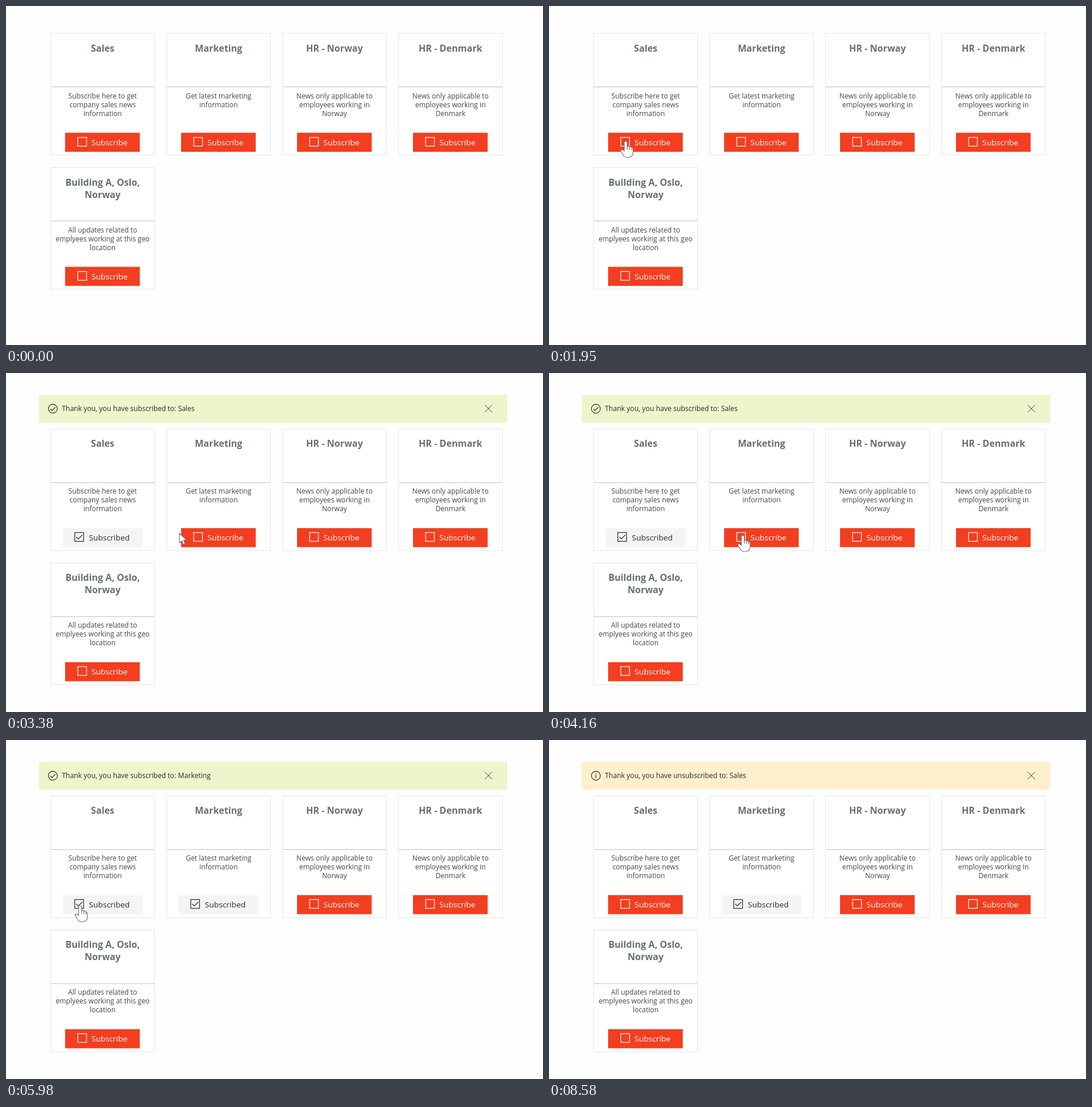
Recreate the animation shown at these times as an HTML page with a canvas. Size 917 by 579 pixels, loop 8.84 s.

```html
<!DOCTYPE html>
<html lang="en">
<head>
<meta charset="utf-8">
<title>Subscriptions</title>
<style>
  html, body { margin: 0; width: 100%; height: 100%; overflow: hidden; background: #fefefe; }
  canvas { display: block; }
</style>
</head>
<body>
<canvas id="stage" width="917" height="579"></canvas>
<script>
const ctx = document.getElementById('stage').getContext('2d');
const LOOP = 8840, STEP = 130;
const FONT = '"Open Sans", "Noto Sans", sans-serif';
const RED = '#f33e20', DARK = '#2b2b2b';

const cards = [
  { title: ['Sales'], body: ['Subscribe here to get', 'company sales news', 'information'] },
  { title: ['Marketing'], body: ['Get latest marketing', 'information'] },
  { title: ['HR - Norway'], body: ['News only applicable to', 'employees working in', 'Norway'] },
  { title: ['HR - Denmark'], body: ['News only applicable to', 'employees working in', 'Denmark'] },
  { title: ['Building A, Oslo,', 'Norway'], body: ['All updates related to', 'emplyees working at this geo', 'location'] }
].map((c, i) => ({ ...c, cx: 165 + 198 * (i % 4), top: 46.5 + 229 * Math.floor(i / 4) }));

// Pointer stops: time, x, y
const stops = [
  [910, 215, 438], [1430, 137, 250], [1690, 133, 237], [1950, 131, 231],
  [2730, 131, 231], [3640, 337, 284], [3770, 333, 280], [4160, 331, 277.5],
  [5070, 331, 277.5], [5980, 126.5, 283], [8060, 126.5, 283], [8450, 22, 560]
];

function pointerAt(t) {
  const i = stops.findIndex(s => s[0] > t);
  if (i === 0 || t >= 8580) return null;
  if (i < 0) return stops[stops.length - 1].slice(1);
  const [t0, x0, y0] = stops[i - 1], [t1, x1, y1] = stops[i];
  const p = (t - t0) / (t1 - t0), e = p * p * (3 - 2 * p);
  return [x0 + (x1 - x0) * e, y0 + (y1 - y0) * e];
}

function text(str, x, y, size, color, align = 'left', weight = 400) {
  ctx.font = `${weight} ${size}px ${FONT}`;
  ctx.textAlign = align;
  ctx.fillStyle = color;
  ctx.fillText(str, x, y);
}

function rect(x, y, w, h, color) {
  ctx.fillStyle = color;
  ctx.fillRect(x, y, w, h);
}

function line(points, color, width) {
  ctx.beginPath();
  points.forEach(([x, y]) => ctx.lineTo(x, y));
  ctx.strokeStyle = color;
  ctx.lineWidth = width;
  ctx.stroke();
}

function drawButton(cx, top, dy, on) {
  const y = top + 170, ty = y + Math.floor(dy);
  const half = on ? 68 : 64, left = cx - (on ? 47.5 : 42.5);
  const ink = on ? DARK : '#fff';
  rect(cx - half, y + dy, half * 2 - (on ? 0 : 0.5), 32.5, on ? '#f4f4f4' : RED);
  ctx.strokeStyle = ink;
  ctx.lineWidth = 1.2;
  ctx.strokeRect(left, ty + 8, 15, 15);
  if (on) line([[left + 2.5, ty + 15.5], [left + 6, ty + 19], [left + 13, ty + 12]], ink, 1.2);
  text(on ? 'Subscribed' : 'Subscribe', cx - (on ? 23.5 : 19), ty + 21.5, 13.5, ink);
}

function drawCard({ title, body, cx, top }, dy, on) {
  const y = Math.round(top + dy - 0.5) + 0.5;
  const ty = top + Math.floor(dy);
  rect(cx - 88.5, y, 177, 208, '#fff');
  ctx.strokeStyle = '#e5e6e6';
  ctx.lineWidth = 1;
  ctx.strokeRect(cx - 88.5, y, 177, 208);
  rect(cx - 88, y + 91, 176, 1.2, '#c6c8c8');
  title.forEach((s, i) => text(s, cx, ty + 31.5 + i * 21, 15.7, '#68706e', 'center', 700));
  body.forEach((s, i) => text(s, cx, ty + 111.5 + i * 15, 11.85, '#444', 'center'));
  drawButton(cx, top, dy, on);
}

function drawBanner(message, warn, closable) {
  rect(56, 37, 800, 48, warn ? '#fef0cd' : '#f0f4cd');
  ctx.beginPath();
  ctx.arc(80, 61, 7.6, 0, Math.PI * 2);
  ctx.strokeStyle = DARK;
  ctx.lineWidth = 1.1;
  ctx.stroke();
  if (warn) {
    rect(79.4, 59.5, 1.3, 5.5, DARK);
    rect(79.4, 56.6, 1.3, 1.5, DARK);
  } else {
    line([[76, 61.5], [78.7, 64.2], [84.3, 58.5]], DARK, 1.1);
  }
  text(message, 95.5, 65, 11.9, DARK);
  if (closable) {
    line([[817.5, 54.5], [830, 67]], DARK, 0.9);
    line([[830, 54.5], [817.5, 67]], DARK, 0.9);
  }
}

const hand = new Path2D(`M-2.5 2 Q-2.5 0 0 0 Q2.5 0 2.5 2 V9
  Q4.5 7.5 6.5 9.5 Q9 8.5 10 11 Q12.5 10.5 12.5 14 V19
  Q12.5 27.5 4 27.5 H2 Q-2 27.5 -4.5 23 L-8 17.5
  Q-9 15 -7 14.3 Q-5 13.8 -2.5 17 Z`);
const knuckles = new Path2D('M2.5 9 V14 M6.5 10 V14.5 M10 11.5 V15');
const arrow = new Path2D('M0 0 V17 L4 13.2 L6.8 19.5 L9.6 18.2 L6.9 12.2 H12.2 Z');

function drawPointer(x, y, isHand) {
  ctx.save();
  ctx.translate(x, y);
  ctx.lineJoin = 'round';
  ctx.lineWidth = 1.2;
  ctx.strokeStyle = '#777';
  ctx.fillStyle = '#fff';
  const shape = isHand ? hand : arrow;
  ctx.fill(shape);
  ctx.stroke(shape);
  if (isHand) ctx.stroke(knuckles);
  ctx.restore();
}

function draw(t) {
  const open = t >= 2470, warn = t >= 6760, marketing = t >= 4550;
  const dy = open ? 48.5 : 0;
  rect(0, 0, 917, 579, '#fefefe');
  if (open) {
    const name = marketing && !warn ? 'Marketing' : 'Sales';
    drawBanner(`Thank you, you have ${warn ? 'un' : ''}subscribed to: ${name}`, warn, t >= 2860);
  }
  cards.forEach((c, i) => drawCard(c, dy, i === 0 ? open && !warn : i === 1 && marketing));

  const p = pointerAt(t);
  if (!p) return;
  const [x, y] = p;
  const overButton = cards.some(c =>
    Math.abs(x - c.cx) < 66 && y > c.top + 170 + dy && y < c.top + 202 + dy);
  drawPointer(x, y, overButton || (open && t < 2860));
}

const start = performance.now();
function tick() {
  const t = (performance.now() - start) % LOOP;
  draw(Math.floor(t / STEP) * STEP);
  requestAnimationFrame(tick);
}
tick();
</script>
</body>
</html>
```
